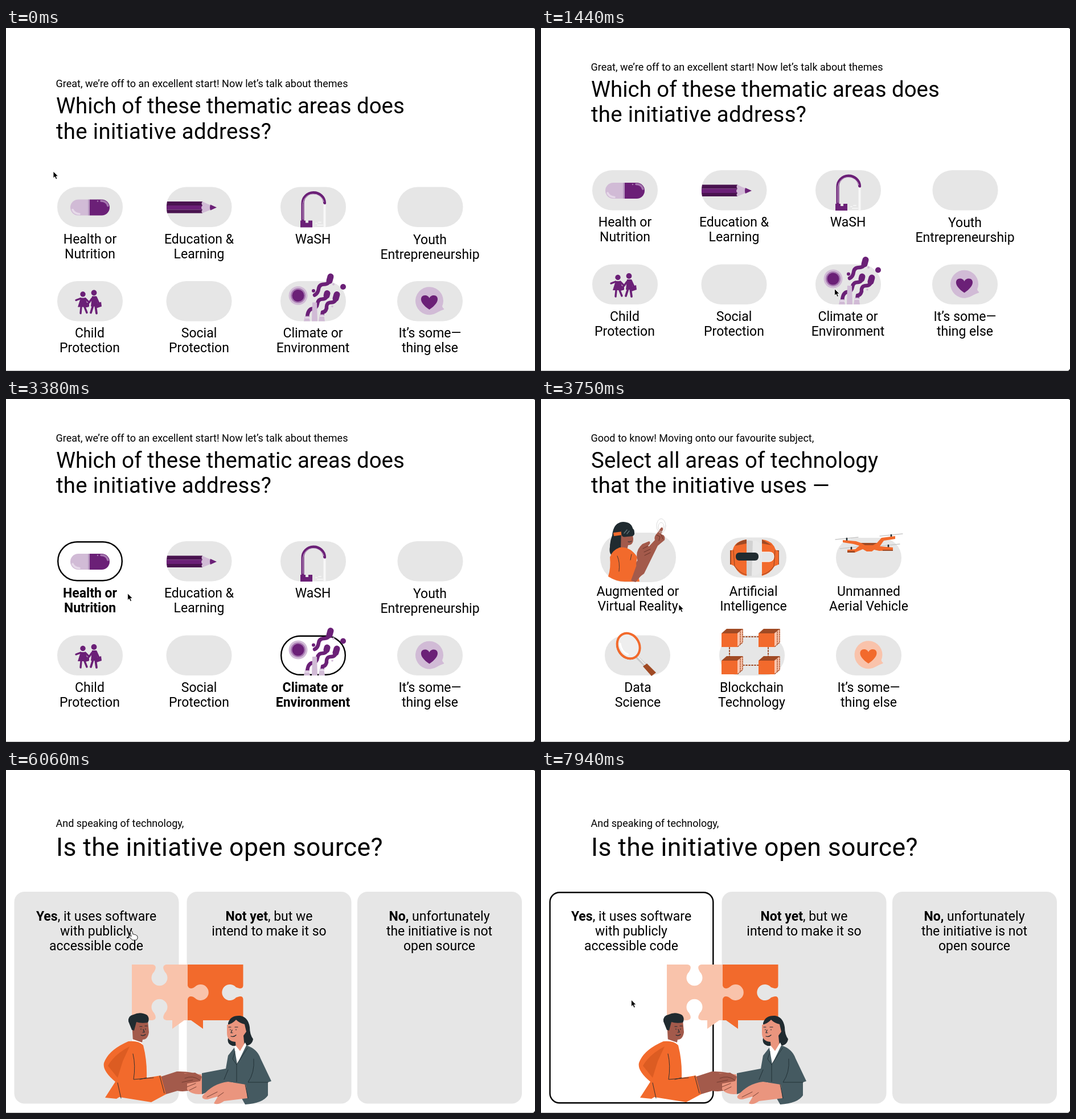
Recreate the animation shown at these times as an HTML page. Size 929 px wide and 603 px high, loop 8000 ms.

```html
<!DOCTYPE html>
<html lang="en">
<head>
<meta charset="utf-8">
<title>Questionnaire</title>
<style>
html, body { margin: 0; width: 100%; height: 100%; overflow: hidden; background: #fff }
svg { display: block; width: 929px; height: 603px }
text { font-family: Roboto, Inter, sans-serif; fill: #000 }
.mid { text-anchor: middle; font-size: 23px }
.b { font-weight: 700 }
.pill { fill: #e6e6e6 }
.on { fill: #fff; stroke: #000; stroke-width: 2.4 }
.p { fill: #6b2077 } .l { fill: #d1bbd6 } .d { fill: #49134f }
.o { fill: #f26a2c } .s { fill: #f9c3ab } .n { fill: #a04a24 }
.k { fill: #202b30 } .w { fill: #fff } .br { fill: #a35a4b } .pk { fill: #ea957e } .suit { fill: #455a61 }
.line { fill: none; stroke-linecap: round; stroke-linejoin: round }
.ps { stroke: #6b2077 } .ks { stroke: #202b30 } .ns { stroke: #a04a24 }
</style>
</head>
<body>
<svg viewBox="0 0 929 603">
<defs>
  <path id="heart" d="M0 13C-20 0-16-12-8-12C-4-12-1-10 0-7C1-10 4-12 8-12C16-12 20 0 0 13z"/>
  <path id="bubble" d="M24.500 0A24.500 24.500 0 1 0 13 20.500Q19 17 25 15L26 14Q23 12 22.500 9A24.500 24.500 0 0 0 24.500 0z"/>
  <g id="cube">
    <path class="n" d="M0 5 9-3H38L28 5z"/><path class="s" d="M28 5 38-3V21L28 29z"/>
    <path class="ns line" stroke-width="1.300" stroke-dasharray="2 2" d="M37-2V21L28 29M33 2V25"/>
    <path class="o" d="M0 5H28V29H0z"/>
  </g>
  <g id="prop">
    <path class="line" stroke="#c9c9c9" stroke-width="1.300" d="M-20 1 20-3"/>
    <path class="line ks" stroke-width="2.600" d="M0-1V4"/>
  </g>
  <g id="arrow"><path d="M0 0V12L2.700 9.500 4.700 14 6.900 13 5 8.700H8.700z" stroke="#fff" stroke-width=".9"/></g>
  <g id="hand"><path fill="#fff" stroke="#222" stroke-width="1" stroke-linejoin="round"
    d="M-2 1Q-2-1 0-1T2 1L3 5Q5 4 6 5.500Q8 5 8.500 6.500Q10.500 6.500 11 9V12L9 15H2L-4 9Q-5 7-3 7L0 8.500z"/></g>
</defs>

<g id="themes">
  <g class="pills"></g>
  <g>
    <path class="l" d="M147 272H127a14 14 0 0 0 0 28H147z"/>
    <path class="p" d="M147 272H168a14 14 0 0 1 0 28H147z"/>
    <path class="line" stroke="#a678b0" stroke-width="3.500" d="M167 274.500Q177 275 179 283"/>
    <circle cx="161" cy="275" r="1.200" fill="#a678b0"/>
    <path class="line" stroke="#e6d9e9" stroke-width="3.500" d="M117 290Q120 297 129 297.500"/>
    <path d="M144 272h3v28h-3z" fill="#b99bc2"/>
  </g>
  <g>
    <path class="l" d="M343 276 360 282V290L343 296z"/>
    <path class="d" d="M283 275.500H345V282.500H282z"/>
    <path class="p" d="M282 282.500H345Q350 286 345 290H282z"/>
    <path class="d" d="M282 290H345V296H283z"/>
    <path class="l" d="M345 275.500q-3 3.500 0 7q-4 4 0 7.500q-3 3.500 0 6l9-4V280z"/>
    <path class="p" d="M359 281 370 286 359 291Q357 286 359 281z"/>
  </g>
  <g>
    <path class="line" stroke="#f8f8f8" stroke-width="4" d="M559.500 279V319"/>
    <path class="line ps" stroke-width="5" stroke-linecap="butt" d="M521 310V279A19.300 18.500 0 0 1 559.600 278"/>
    <path class="line" stroke="#d1bbd6" stroke-width="1" d="M521.500 307V279A18.500 17.500 0 0 1 558 276"/>
    <path class="p" d="M517 309H526V313H531V309H538V321H517z"/>
    <path class="line" stroke="#f4f4f4" stroke-width="2" d="M544 314h2M549 312h4M547 317H556"/>
  </g>
  <g>
    <circle class="p" cx="135" cy="438.500" r="4.700"/><circle class="p" cx="154.500" cy="436" r="4.900"/>
    <path class="p" d="M131 445H139L145 461H126z"/>
    <path class="line ps" stroke-width="3.400" d="M131 446 123 449M139 446 146 453 151 446M132 461 131 472M138 461 142 471"/>
    <path class="p" d="M151 442H158L161 457 158 460H149z"/>
    <path class="line ps" stroke-width="3.800" d="M153 458 149 471M157 458 159 472M158 444 163 455"/>
    <path class="p" d="M158 455 167 452 168 460 159 463z"/>
    <path class="p" d="M139 454 146 453V460L140 462z"/>
  </g>
  <g>
    <circle class="l" cx="513" cy="441" r="16.500"/><circle cx="513" cy="441" r="13" fill="#a678b0"/><circle class="p" cx="513" cy="441" r="10.500"/>
    <path class="line ps" stroke-width="6.500" d="M570 409Q568 421 559 421T549 429Q548 437 542 440M564 436Q564 447 556 447T547 455Q546 463 538 464T529 479M580 441Q580 453 571 453T563 463Q561 470 556 470L555 477"/>
    <path class="line ps" stroke-width="11" d="M570 407.500 568 415M564 437 563 441M581 439 579 446"/>
    <circle class="p" cx="540" cy="432.500" r="3"/><circle class="p" cx="592" cy="425.500" r="5"/>
    <circle class="l" cx="575" cy="421" r="2"/><circle class="l" cx="573" cy="460" r="1.800"/>
    <path class="l" d="M525 477H532L534 486H523zM538 453H546L547 486H537zM551 474H558L560 486H549z"/>
    <path stroke="#f1e8f3" stroke-width="1.400" d="M525 480H533M551 477H559"/>
  </g>
  <use href="#bubble" class="l" x="743.500" y="450.500"/><use href="#heart" class="p" x="743.500" y="452.500"/>
</g>

<g id="tech">
  <g class="pills"></g>
  <g>
    <path class="k" d="M125 240Q127 217 144 216Q160 216 162 231L152 258 139 265Q140 279 132 279Q118 276 121 260Q121 250 125 240z"/>
    <path class="br" d="M141 231H160L162 246Q162 257 153 257L151 266 140 263z"/>
    <path class="line ks" stroke-width="1" d="M153 251Q157 252 159 250"/>
    <path class="o" d="M127 235 143 233V239L128 241z"/>
    <rect class="k" x="141" y="228" width="23" height="14" rx="5" transform="rotate(-5 152 235)"/>
    <path class="line" stroke="#627177" stroke-width="1.500" d="M146 236 151 230M151 237 155 232"/>
    <path class="br" d="M160 296 185 264 200 248Q198 242 203 237L211 226Q215 225 214 230L211 238Q219 239 217 248L205 258 181 307 166 318z"/>
    <path class="o" d="M138 261Q157 259 169 278L167 290 173 321H147Q132 321 118 312Q123 297 121 278Q125 266 138 261z"/>
    <path class="br" d="M158 319 170 286Q164 267 178 255L190 250Q194 253 188 258L194 263Q196 275 183 283L178 308 166 322z"/>
    <path class="line" stroke="#683328" stroke-width="1" d="M179 263 187 259M181 269 192 264M182 275 192 270M203 239 209 242 207 249M211 238 214 246"/>
    <path class="line ks" stroke-width=".8" d="M134 276Q139 287 137 303M159 273 157 283"/>
    <g class="line" stroke="#dcdcdc"><ellipse cx="211" cy="223" rx="8" ry="12.500"/><ellipse cx="211" cy="225" rx="5" ry="8"/></g>
  </g>
  <g>
    <path d="M361 249Q380 247 386 263V302Q377 313 361 311z" fill="#d2d2d2"/>
    <path d="M372 249Q390 249 390 270V300Q382 310 370 311z" fill="#e9e9e9"/>
    <path class="n" d="M332 266H337V291H332zM412 266H418V291H412z"/>
    <path class="o" d="M361 247V311Q347 309 340 294L334 291V267L337 265Q340 250 361 247zM388 247Q407 249 412 265L417 268V291L410 294Q403 307 388 311z"/>
    <path class="line ns" stroke-width="1.200" d="M338 266 340 294Q350 307 361 309M411 266 409 294Q401 306 388 309"/>
    <path class="n" d="M361 247Q347 249 341 258L361 254zM388 247 405 257 388 254z"/>
    <rect class="k" x="342" y="270" width="40" height="14" rx="6"/>
    <path class="pill" d="M388 269H401Q409 269 409 277T401 286H388z"/>
    <path class="line" stroke="#fff" d="M388 269H401Q409 269 409 277T401 286H388"/>
  </g>
  <g>
    <use href="#prop" x="537" y="246"/><use href="#prop" x="615" y="240"/><use href="#prop" x="545" y="262"/><use href="#prop" x="610" y="258"/>
    <path class="o" d="M530 248 553 250 562 253H590L598 244 622 241V246L602 249 595 259 618 261V266L594 267 585 265 581 268H572L565 264 551 270H538V265L552 264 559 258 549 255 530 252z"/>
    <path class="n" d="M562 253H590L583 257H569zM538 267H551V270H538zM600 265H618V267H600z"/>
    <path class="o" d="M570 257H583L580 266H573z"/>
  </g>
  <g>
    <path class="line" stroke="#c8c8c8" stroke-width="6" stroke-linecap="butt" d="M169 454 185 470"/>
    <path class="line" stroke="#eee" stroke-width="2" d="M170 453 184 468"/>
    <path class="n" d="M179 470 186 465 202 481 194 487z"/>
    <g transform="rotate(-28 153 435)"><ellipse cx="153" cy="435" rx="20" ry="24" class="n"/><ellipse cx="154" cy="434.500" rx="19" ry="23" fill="#eee" stroke="#f26a2c" stroke-width="4"/>
    <path class="line" stroke="#fff" stroke-width="3" d="M143 424Q138 438 146 447"/></g>
  </g>
  <g>
    <path class="line ns" stroke-width="2" stroke-dasharray="2 3" stroke-linecap="butt" d="M355 418H382M331 437V454M399 437V454M355 468H382"/>
    <use href="#cube" x="317" y="407"/><use href="#cube" x="382" y="407"/><use href="#cube" x="317" y="455"/><use href="#cube" x="382" y="455"/>
  </g>
  <use href="#bubble" class="s" x="575" y="450"/><use href="#heart" class="o" x="575" y="452"/>
</g>

<g id="source">
  <g class="pills"></g>
  <g>
    <path class="o" d="M319 342H416.500V379Q416 386 407 383L404 382A14 14 0 1 0 404 400L407 399Q416 396 416.500 403V440H346V455L325 440H319z"/>
    <path class="s" d="M221 342H257Q265 343 262 351L260 355A14 14 0 1 0 279 355L277 351Q274 343 282 342H319V379Q321 386 329 383L332 381A14 14 0 1 1 332 401L329 399Q321 396 319 403V440H313L292 455V440H282Q274 439 277 431L279 427A14 14 0 1 0 260 427L262 431Q265 439 257 440H221z"/>
  </g>
  <g>
    <path class="br" d="M221 441 249 440 251 461Q249 474 240 474L238 483 223 477z"/>
    <path class="k" d="M215 442Q214 432 224 430Q236 424 248 431Q253 437 249 444Q237 446 229 443L225 458 221 457z"/>
    <path class="line ks" stroke-width="1.200" d="M235 451h4M244 450h4M237 455v1M245 455v1M241 456l2 5h-3M237 466Q241 468 245 465"/>
    <path class="w" d="M222 473 239 479 239 483 221 478z"/>
    <path class="br" d="M266 541 300 530Q325 529 341 537L344 546 332 560Q316 567 301 564L281 570 263 574z"/>
    <path class="o" d="M215 477Q233 475 241 484Q248 511 247 541L272 537 281 570 255 584 199 575 194 578 174 576 192 548Q169 529 172 515Q180 492 215 477z"/>
    <path d="M217 486Q190 500 179 520L196 541 205 512z" fill="#dc5c22"/>
    <path class="line ks" stroke-width=".9" d="M223 499Q228 520 224 544L259 541M247 541 235 544M270 538 278 568M196 550 202 577"/>
  </g>
  <g>
    <path class="k" d="M390 445Q394 431 411 432Q425 434 428 452Q428 465 434 473Q432 486 416 485L398 485Q386 481 391 468z"/>
    <path class="pk" d="M388 448Q398 446 404 439Q410 445 419 447L422 460 417 467 419 487 405 502 403 478Q388 477 388 462z"/>
    <path class="line ks" stroke-width="1.200" d="M391 452h4M402 452h5M394 456v1M404 456v1M397 457l-2 5h3M395 468Q400 470 404 466"/>
    <path class="w" d="M403 484 411 494 420 479 425 490 405 515 400 491z"/>
    <path class="pk" d="M343 535 314 533Q304 538 304 546L318 551 318 562Q329 573 348 569z"/>
    <path class="br" d="M301 535 332 532 344 539 341 547 314 552 300 548z"/>
    <path class="suit" d="M401 488 406 517 422 484Q441 490 447 507L466 547 460 549V572Q451 586 420 588L398 549 344 570V533L386 525 390 502z"/>
    <path class="pk" d="M421 553 390 548Q363 551 345 573Q343 579 354 579L372 574 365 586Q372 590 383 582L424 577z"/>
    <path class="line" stroke="#1f2d33" stroke-width=".9" d="M402 495 398 508 405 518 424 489M405 518V548M435 508Q437 532 425 549L460 549M390 527 383 544M420 553 425 577"/>
    <path class="line" stroke="#6b382d" stroke-width=".9" d="M314 542Q328 536 340 545M309 549 328 545M318 557 333 551M322 563 334 557M353 575 371 566M372 574 382 567"/>
  </g>
</g>

<path fill="#b9b9b9" d="M0 602H929V603H0z"/>
<path d="M926.500 0H929V1.500z"/>
<path id="corner" d="M929 599V603H925Q928 602 929 599z"/>
<use id="cursor"/>
</svg>

<script>
const $ = id => document.getElementById(id);
const STEP = 62.5, LOOP = 8000;
const themes = $('themes'), tech = $('tech'), source = $('source');
const add = (el, html) => el.insertAdjacentHTML('beforeend', html);

const text = (page, x, y, size, str, gap = 0) =>
  add(page, `<text x="${x}" y="${y}" font-size="${size}" letter-spacing="${gap}">${str}</text>`);

const lines = (x, y, str, cls) => str.split('|').map((s, i) =>
  `<text class="mid ${cls}" x="${x}" y="${y + 26 * i}">${s}</text>`).join('');

function pill(page, x, y, w, h, r, picked) {
  const box = (cls, i) => `<rect class="${cls}" x="${x + i}" y="${y + i}" width="${w - 2 * i}" height="${h - 2 * i}" rx="${r - i}"/>`;
  add(page.querySelector('.pills'), box('pill', 0) + (picked ? `<g class="picked">${box('on', 1.2)}</g>` : ''));
}

function option(page, x, y, textX, textY, str, picked) {
  pill(page, x, y, 115, 70.5, 35, picked);
  add(page, `<g class="${picked ? 'plain' : ''}">${lines(textX, textY, str, '')}</g>`);
  if (picked) add(page, `<g class="picked">${lines(textX, textY, str, 'b')}</g>`);
}

text(themes, 87.5, 74.5, 18, 'Great, we’re off to an excellent start! Now let’s talk about themes');
text(themes, 88, 120.5, 38.4, 'Which of these thematic areas does');
text(themes, 88, 165, 38.4, 'the initiative address?', .3);
option(themes, 90, 250, 147.5, 349, 'Health or|Nutrition', true);
option(themes, 281.5, 250, 339, 349, 'Education &amp;|Learning');
option(themes, 482, 250, 539, 349, 'WaSH');
option(themes, 687.5, 250, 744.5, 350, 'Youth|Entrepreneurship');
option(themes, 90, 415.5, 147, 514.5, 'Child|Protection');
option(themes, 281.5, 415.5, 339, 514.5, 'Social|Protection');
option(themes, 482, 415.5, 539, 514.5, 'Climate or|Environment', true);
option(themes, 687, 415.5, 744.5, 514.5, 'It’s some—|thing else');

text(tech, 87.5, 74.5, 18, 'Good to know! Moving onto our favourite subject,');
text(tech, 88, 120.5, 38.4, 'Select all areas of technology', .1);
text(tech, 88, 165, 38.4, 'that the initiative uses —', .2);
pill(tech, 104, 235, 133, 87, 43);
add(tech, lines(170, 345.5, 'Augmented or|Virtual Reality', ''));
option(tech, 316, 243.5, 373, 345.5, 'Artificial|Intelligence');
option(tech, 518, 244, 575.5, 345.5, 'Unmanned|Aerial Vehicle');
option(tech, 112, 415.5, 170, 514.5, 'Data|Science');
option(tech, 313, 415.5, 370, 514.5, 'Blockchain|Technology');
option(tech, 518, 415.5, 575.5, 514.5, 'It’s some—|thing else');

text(source, 87.5, 99.5, 18, 'And speaking of technology,');
text(source, 88, 151, 44.5, 'Is the initiative open source?', .4);
pill(source, 14.5, 214, 289, 372.5, 18, true);
pill(source, 317.5, 214, 289, 372.5, 18);
pill(source, 617, 214, 289, 372.5, 18);
const bold = s => `<tspan class="b">${s}</tspan>`;
add(source, lines(158.5, 264.5, bold('Yes') + ', it uses software|with publicly|accessible code', ''));
add(source, lines(462, 264.5, bold('Not yet') + ', but we|intend to make it so', ''));
add(source, lines(761, 264.5, bold('No,') + ' unfortunately|the initiative is not|open source', ''));

// cursor path: time, x, y
const path = [
  [0, 83, 252], [687, 83, 252], [875, 330, 350], [1000, 594, 446], [1125, 541, 453],
  [1375, 541, 453], [1500, 490, 464], [1750, 81, 300], [1875, 156, 282],
  [2875, 156, 282], [3062, 152, 300], [3562, 242, 361],
  [4062, 242, 361], [4562, 146, 228], [4875, 137, 239],
  [5625, 137, 239], [5875, 220, 284],
  [6937, 220, 284], [7125, 155, 415], [7187, 158.5, 404], [8000, 158.5, 404]
];

function cursorAt(t) {
  const i = path.findIndex(p => p[0] > t);
  const [t0, x0, y0] = path[i - 1], [t1, x1, y1] = path[i];
  const u = (t - t0) / (t1 - t0), k = u * u * (3 - 2 * u);
  return [x0 + (x1 - x0) * k, y0 + (y1 - y0) * k];
}

const show = (el, on) => el.style.display = on ? '' : 'none';
const cardPick = source.querySelector('.picked');
const themePicks = themes.querySelectorAll('.picked'), themePlain = themes.querySelectorAll('.plain');

function draw(ms) {
  const t = Math.floor((ms % LOOP + 3) / STEP) * STEP % LOOP;
  show(themes, t < 3750);
  show(tech, t >= 3750 && t < 6060);
  show(source, t >= 6060);
  show($('corner'), t >= STEP);
  themes.setAttribute('transform', `translate(0 ${t < STEP ? 29.5 : t < 2 * STEP ? 8 : 0})`);
  const picked = t >= 2187;
  themePicks.forEach(el => show(el, picked));
  themePlain.forEach(el => show(el, !picked));
  cardPick.style.opacity = Math.min(1, Math.max(0, (t - 7312) / 250));
  const [x, y] = cursorAt(t), c = $('cursor');
  c.setAttribute('href', t >= 6060 && t < 7000 ? '#hand' : '#arrow');
  c.setAttribute('transform', `translate(${x} ${y})`);
}

const start = performance.now();
function tick() {
  draw(performance.now() - start);
  requestAnimationFrame(tick);
}
tick();
</script>
</body>
</html>
```
